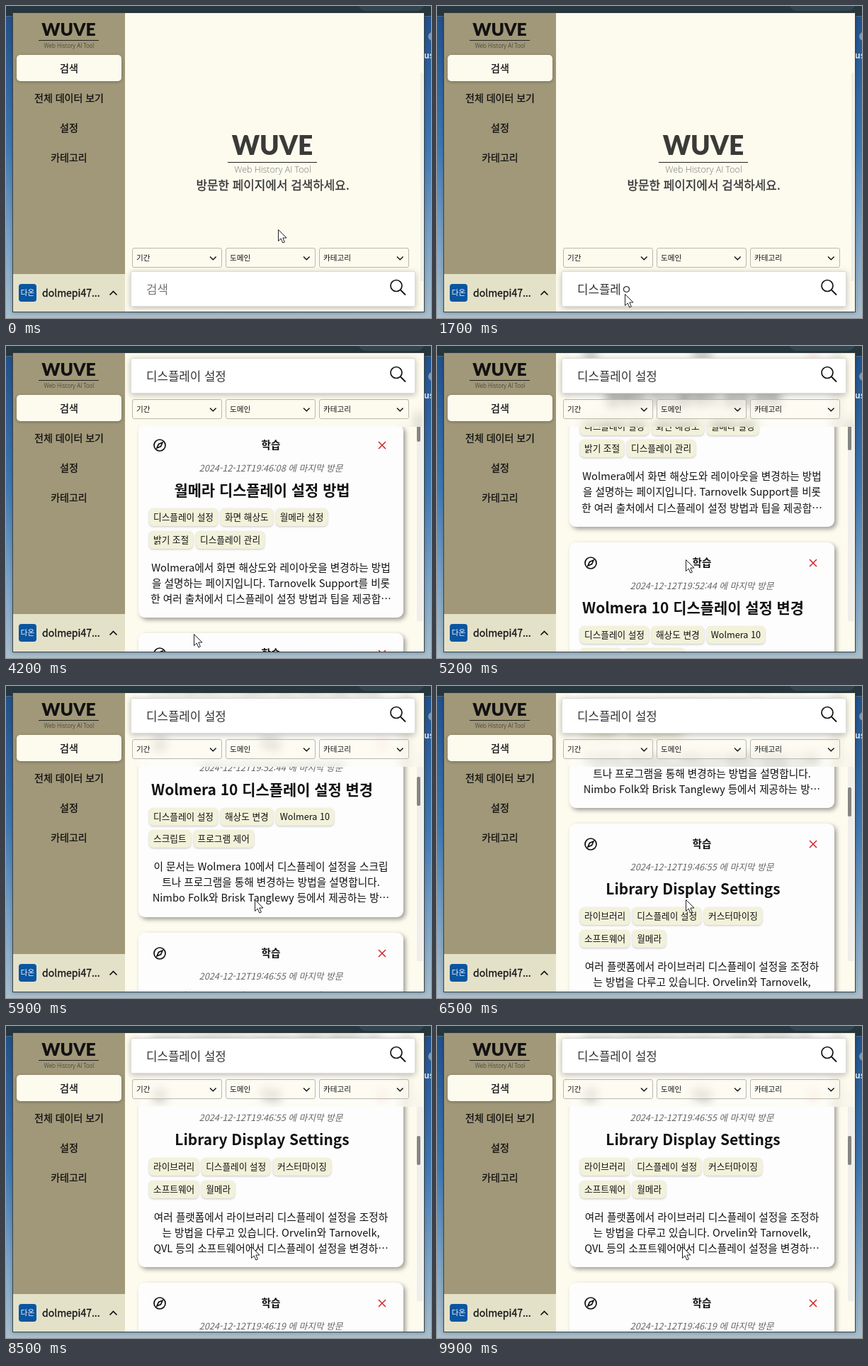
Animation of 600 by 440 pixels, one loop 10000 ms. Source, as an HTML page:

```html
<!DOCTYPE html>
<html lang="ko">
<head>
<meta charset="utf-8">
<style>
html, body { margin: 0; width: 100%; height: 100%; overflow: hidden; }
body { font-family: "Noto Sans CJK KR", "Noto Sans KR", "Noto Sans CJK JP", "Noto Sans CJK", sans-serif; color: #111; }
div, svg { position: absolute; box-sizing: border-box; }
svg { left: 0; top: 0; overflow: visible; fill: none; }
.t { line-height: 0; height: 0; white-space: nowrap; }
.c { width: 600px; margin-left: -300px; text-align: center; }
.logo { font-family: Lato, sans-serif; font-weight: 900; }
.sub { font-family: "Open Sans", "Noto Sans", sans-serif; font-weight: 300; }
.medium { -webkit-text-stroke: .3px; }
#stage { left: 0; top: 0; width: 600px; height: 440px; overflow: hidden; background: linear-gradient(#22518b 14px, #3f78b2 45%, #7ba3c6 75%, #a9bfcd); }
#desk { left: 0; top: 0; width: 600px; height: 15px; background: #26373f; border-bottom: 1px solid #55707e; }
#tab { left: 497px; top: -20px; width: 94px; height: 27px; border-radius: 12px; background: #33464f; }
#win { left: 9px; top: 9px; width: 582px; height: 423px; background: #fdfbee; border: 1px solid #3c4245; box-shadow: 0 1px 5px rgba(0,0,0,.25); }
.clip { left: 168px; top: 10px; width: 421px; height: 421px; overflow: hidden; }
.page { left: -168px; top: -10px; width: 600px; height: 440px; }
#header { height: 104px; background: #fdfbee; }
#header .page { filter: blur(7px); opacity: .65; }
.list { left: 0; top: 0; }
.track { left: 580px; top: 94px; width: 9px; height: 294px; background: #efeeea; }
.thumb { left: 580px; width: 5px; height: 41px; border-radius: 2px; background: #858583; }
.card { left: 187px; width: 374px; height: 272px; border-radius: 9px; background: #fdfdfd; box-shadow: 3px 3px 6px rgba(0,0,0,.38); }
.chips { left: 15px; display: flex; gap: 4px; }
.chips div { position: static; height: 25px; line-height: 23px; padding: 0 6px; border-radius: 6px; background: #f2f1da; box-shadow: 0 1px 3px rgba(0,0,0,.22); font-size: 12.65px; white-space: nowrap; }
#box { left: 175.5px; width: 402px; height: 50px; background: #fff; border: 1px solid #dcdcdc; border-radius: 2px; box-shadow: 0 2px 8px rgba(0,0,0,.25); }
.select { width: 127px; height: 28px; border: 1px solid #bbb9ae; border-radius: 3px; background: rgba(253,251,238,.6); }
#side { left: 10px; top: 10px; width: 158px; height: 368px; background: #a19879; }
#user { left: 10px; top: 378px; width: 158px; height: 53px; background: #e4e1c9; }
#active { left: 15px; top: 69px; width: 148px; height: 37px; border-radius: 5px; background: #fdfbee; box-shadow: 0 1px 4px rgba(0,0,0,.3); }
#face { left: 18px; top: 392px; width: 25px; height: 25px; border-radius: 4px; background: #0a56a0; }
</style>
</head>
<body>
<div id="stage"></div>
<script>
const text = (x, y, size, str, cls = "", css = "") =>
  `<div class="t ${cls}" style="left:${x}px;top:${y}px;font-size:${size}px;${css}">${str}</div>`;
const mid = (x, y, size, str, css, cls = "") => text(x, y, size, str, "c " + cls, css);
const path = (d, color = "#111", width = 1.5) => `<path d="${d}" stroke="${color}" stroke-width="${width}"/>`;
const svg = (body, attr = "") => `<svg width="1" height="1" ${attr}>${body}</svg>`;

const cards = [
  { time: "46:08", title: "월메라 디스플레이 설정 방법",
    chips: [["디스플레이 설정", "화면 해상도", "월메라 설정"], ["밝기 조절", "디스플레이 관리"]],
    lines: ["Wolmera에서 화면 해상도와 레이아웃을 변경하는 방법", "을 설명하는 페이지입니다. Tarnovelk Support를 비롯", "한 여러 출처에서 디스플레이 설정 방법과 팁을 제공합…"] },
  { time: "52:44", title: "Wolmera 10 디스플레이 설정 변경",
    chips: [["디스플레이 설정", "해상도 변경", "Wolmera 10"], ["스크립트", "프로그램 제어"]],
    lines: ["이 문서는 Wolmera 10에서 디스플레이 설정을 스크립", "트나 프로그램을 통해 변경하는 방법을 설명합니다.", "Nimbo Folk와 Brisk Tanglewy 등에서 제공하는 방…"] },
  { time: "46:55", title: "Library Display Settings",
    chips: [["라이브러리", "디스플레이 설정", "커스터마이징"], ["소프트웨어", "월메라"]],
    lines: ["여러 플랫폼에서 라이브러리 디스플레이 설정을 조정하", "는 방법을 다루고 있습니다. Orvelin와 Tarnovelk,", "QVL 등의 소프트웨어에서 디스플레이 설정을 변경하…"] },
  { time: "46:19", title: "", chips: [], lines: [] }
];

const compass = '<circle cx="30" cy="29" r="8" stroke="#111" stroke-width="1.7"/>'
  + path("M34 25L31.6 30.6L26 33L28.4 27.4Z", "#111", 1.7);

const card = (c, i) => `<div class="card" style="top:${111 + i * 294}px">
  ${svg(compass + path("M339 24l10 10m0-10l-10 10", "#d8232a"))}
  ${mid(187, 28, 14.6, "학습", "font-weight:700")}
  ${mid(187, 61, 12.7, `2024-12-12T19:${c.time} 에 마지막 방문`, "font-style:italic;color:#666")}
  ${mid(174.5, 91, 20.9, c.title, "font-weight:700")}
  ${c.chips.map((row, r) => `<div class="chips" style="top:${118 + r * 31.5}px">${row.map(s => `<div>${s}</div>`).join("")}</div>`).join("")}
  ${c.lines.map((s, r) => mid(187, 200.5 + r * 22.2, 14.65, s)).join("")}
</div>`;

const results = `<div class="list">${cards.map(card).join("")}</div>
  <div class="track"></div><div class="thumb"></div>`;

const select = (label, i) => `<div class="select" style="left:${178 + i * 132}px">
  ${text(5, 13, 10.6, label)}${svg(path("M109 11.5l4.3 4.3l4.3-4.3", "#111", 1.4))}</div>`;

const stage = document.getElementById("stage");
stage.innerHTML = `
<div id="desk"></div><div id="tab"></div>
${svg('<circle cx="602" cy="43" r="6" fill="#7f98b0"/>')}
${text(590, 69, 12, "us", "", "color:#e4ebf2;font-weight:700")}
<div id="win"></div>
<div id="home" style="left:0;top:0">
  <div id="words" style="left:0;top:0">
    ${mid(376, 196, 37, "WUVE", "color:#3a3a38", "logo")}
    ${mid(376.5, 231, 12.5, "Web History AI Tool", "color:#777", "sub")}
    ${mid(376.5, 252, 16.9, "방문한 페이지에서 검색하세요.", "color:#333", "medium")}
  </div>
  ${svg(path("M313 220.5H439", "#222", 1))}
  <div style="left:585px;top:94px;width:4px;height:294px;background:#efeee8"></div>
</div>
${svg(`<circle cx="377" cy="219" r="29" stroke="#dedcd4" stroke-opacity=".85" stroke-width="5.5"/>
  <path id="arc" d="M356.5 198.5A29 29 0 0 1 397.5 198.5" stroke="#3498db" stroke-width="5.5"/>`, 'id="spin"')}
<div id="results" class="clip"><div class="page">${results}</div></div>
<div id="header" class="clip"><div class="page">${results}</div></div>
<div id="selects" style="left:0">${["기간", "도메인", "카테고리"].map(select).join("")}</div>
<div id="box">
  <div id="query" class="t" style="left:21.5px;top:24px;font-size:16.8px"></div>
  ${svg('<circle cx="374" cy="19.5" r="8" stroke="#111" stroke-width="1.7"/>' + path("M380 25.5l7 7", "#111", 1.8))}
</div>
<div id="side"></div><div id="user"></div><div id="active"></div>
${mid(88.5, 33, 24.7, "WUVE", "color:#111", "logo")}
${svg(path("M46 48.5H131", "#222", 1))}
${mid(89, 56, 8.2, "Web History AI Tool", "color:#222", "sub")}
${["검색", "전체 데이터 보기", "설정", "카테고리"].map((s, i) => mid(89, 87 + i * 42, 14, s, "", "medium")).join("")}
<div id="face"></div>
${mid(30.5, 404, 10.5, "다온", "color:#fff")}
${text(51, 404, 14, "dolmepi47...", "medium")}
${svg(path("M146.5 407.5l5-5l5 5", "#111", 1.7))}
${svg('<path d="M.5.5V16.5L4.2 13L6.8 19L9.4 17.9L6.8 12H12Z" fill="#fff" stroke="#222"/>', 'id="mouse"')}`;

const el = id => document.getElementById(id);
const show = (id, on) => { el(id).style.display = on ? "" : "none"; };
const setTop = (selector, y) => stage.querySelectorAll(selector).forEach(e => { e.style.top = y + "px"; });
const clamp = v => Math.min(1, Math.max(0, v));

// Keystrokes of Korean input: first consonant, then vowel, then final consonant
const leads = "ㄱㄲㄴㄷㄸㄹㅁㅂㅃㅅㅆㅇㅈㅉㅊㅋㅌㅍㅎ";
const strokes = [""];
let done = "";
for (const ch of "디스플레이 설정") {
  const n = ch.charCodeAt(0) - 0xAC00;
  if (n >= 0) {
    strokes.push(done + leads[Math.floor(n / 588)]);
    if (n % 28) strokes.push(done + String.fromCharCode(0xAC00 + n - n % 28));
  }
  strokes.push(done += ch);
}

const SEARCH = 2500, LOADED = 3700;
const notches = [4940, 5199, 5767, 6200, 6600];
const scrollAt = t => notches.reduce((sum, s) => sum + 126.2 * (1 - (1 - clamp((t - s) / 250)) ** 2), 0);

const mousePath = [[0, 384, 315], [300, 384, 315], [900, 265, 406], [4400, 265, 406], [4850, 351, 301],
  [6700, 351, 301], [7100, 348, 310], [7500, 348, 310], [8000, 346, 311], [10000, 346, 311]];
function mouseAt(t) {
  const i = mousePath.findIndex(k => k[0] > t);
  const [a, b] = [mousePath[i - 1], mousePath[i]];
  const p = (t - a[0]) / (b[0] - a[0]), e = p * p * (3 - 2 * p);
  return [a[1] + (b[1] - a[1]) * e, a[2] + (b[2] - a[2]) * e];
}

function draw(t) {
  const searched = t >= SEARCH, loaded = t >= LOADED;
  show("home", !loaded);
  show("results", loaded);
  show("header", loaded);
  show("spin", searched && !loaded);
  el("words").style.opacity = searched ? .6 : 1;
  el("arc").setAttribute("transform", `rotate(${160 + (t - 3100) * .36} 377 219)`);
  setTop("#box", searched ? 16.5 : 373.5);
  setTop("#selects", searched ? 75 : 340.5);

  const typed = strokes[Math.round(clamp((t - 1000) / 1300) * (strokes.length - 1))];
  el("query").textContent = typed || "검색";
  el("query").style.color = typed ? "#333" : "#777";

  const y = scrollAt(t);
  setTop(".list", -y);
  setTop(".thumb", 94 + y * .0967);
  const [mx, my] = mouseAt(t);
  el("mouse").style.left = mx - .5 + "px";
  setTop("#mouse", my - .5);
}

const start = performance.now();
function tick() {
  draw((performance.now() - start) % 10000);
  requestAnimationFrame(tick);
}
tick();
</script>
</body>
</html>
```
